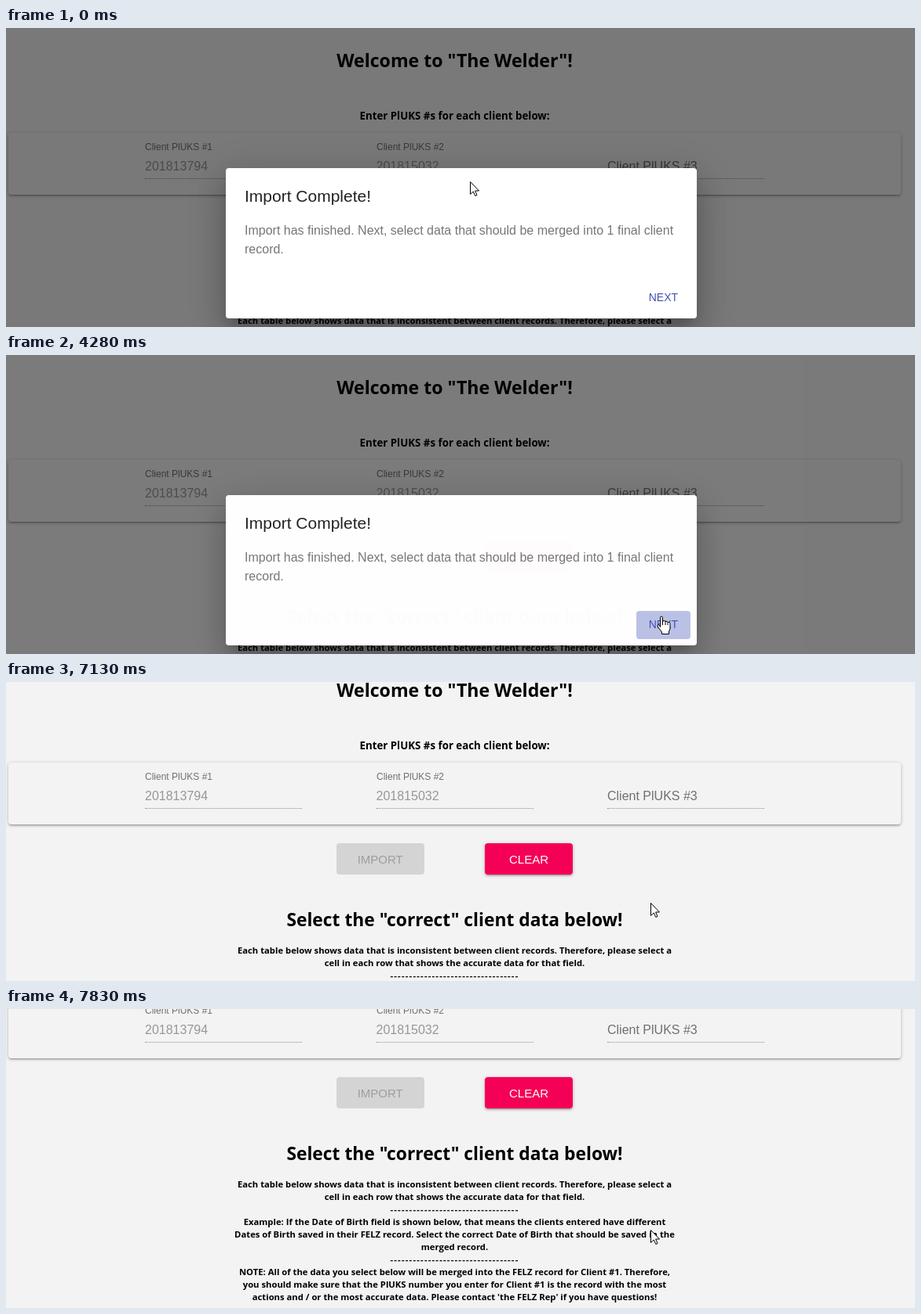
Write an HTML page that moves like this. It is 1158 by 382 pixels and loops after 8 s.

```html
<!DOCTYPE html>
<html lang="en">
<head>
<meta charset="utf-8">
<title>Client merge</title>
<style>
  html, body { margin: 0; width: 100%; height: 100%; overflow: hidden; background: #f3f3f3; }
  #stage { position: relative; width: 1158px; height: 382px; overflow: hidden; }
  #stage div, svg { position: absolute; }
  svg { left: 0; top: 0; overflow: visible; }
  text { font-family: "Liberation Sans", Arial, sans-serif; font-size: 16px; fill: rgba(0,0,0,.54); }

  #page { left: 0; top: 0; width: 1158px; height: 560px; }
  .bold text { font: 700 11.28px "Open Sans", "Noto Sans", sans-serif; fill: #000; text-anchor: middle; }
  .bold .title { font-size: 23.1px; }
  .bold .heading { font-size: 22.8px; }
  .bold .lead { font-size: 13.3px; }
  .bold .rule { letter-spacing: 1.2px; }
  .label { font-size: 12px; }
  .value { fill: rgba(0,0,0,.38); }
  .button { font-size: 15px; text-anchor: middle; fill: #fff; }
  .button.off { fill: rgba(0,0,0,.26); }

  .raised { border-radius: 4px;
    box-shadow: 0 1px 5px rgba(0,0,0,.2), 0 2px 2px rgba(0,0,0,.14), 0 3px 1px -2px rgba(0,0,0,.12); }
  .card { left: 3px; top: 134px; width: 1137px; height: 79px; background: #f3f3f3; }
  .line { top: 192px; width: 200px; border-bottom: 1px dotted rgba(0,0,0,.42); }
  .import, .clear { top: 237px; width: 112px; height: 40px; border-radius: 4px; }
  .import { left: 421px; background: #d4d4d4; }
  .clear { left: 610px; background: #f50057; }

  #modal { inset: 0; background: rgba(0,0,0,.5); }
  .dialog { left: 280px; top: 179px; width: 600px; height: 192px; border-radius: 4px; background: #fff;
    box-shadow: 0 11px 15px -7px rgba(0,0,0,.2), 0 24px 38px 3px rgba(0,0,0,.14), 0 9px 46px 8px rgba(0,0,0,.12); }
  #next { left: 803px; top: 327px; width: 69px; height: 36px; border-radius: 4px; overflow: hidden; }
  #ripple { left: 32px; top: 7px; border-radius: 50%; background: rgba(63,81,181,.3); transform: translate(-50%, -50%); }
  .dialog-title { font-size: 21px; fill: rgba(0,0,0,.87); }
  .next-label { font-size: 14px; fill: #3f51b5; }
  #cursor path { fill: #fff; stroke: #000; stroke-linejoin: round; }
</style>
</head>
<body>
<div id="stage">
  <div id="page">
    <div class="card raised"></div>
    <div class="line" style="left:177px"></div>
    <div class="line" style="left:472px"></div>
    <div class="line" style="left:766px"></div>
    <div class="import"></div>
    <div class="clear raised"></div>
    <svg width="1158" height="560">
      <g class="bold" id="copy">
        <text class="title" x="571.5" y="50">Welcome to "The Welder"!</text>
        <text class="lead" x="571.5" y="117">Enter PlUKS #s for each client below:</text>
        <text class="heading" x="571.5" y="343">Select the "correct" client data below!</text>
      </g>
      <text class="label" x="177" y="156">Client PlUKS #1</text>
      <text class="label" x="472" y="156">Client PlUKS #2</text>
      <text class="value" x="177" y="182">201813794</text>
      <text class="value" x="471.5" y="182">201815032</text>
      <text x="766" y="182">Client PlUKS #3</text>
      <text class="button off" x="476.7" y="263">IMPORT</text>
      <text class="button" x="666" y="263">CLEAR</text>
    </svg>
  </div>

  <div id="modal">
    <div class="dialog"></div>
    <div id="next"><div id="ripple"></div></div>
    <svg width="1158" height="382">
      <text class="dialog-title" x="304" y="222">Import Complete!</text>
      <text x="304" y="264">Import has finished. Next, select data that should be merged into 1 final client</text>
      <text x="304" y="288">record.</text>
      <text class="next-label" x="818.7" y="349">NEXT</text>
    </svg>
  </div>

  <svg width="1158" height="382">
    <g id="cursor">
      <circle id="press" r="12" fill="#ff0" fill-opacity=".47"/>
      <path id="arrow" d="M.5.5V16.5L4.3 13 6.8 18.5 9 17.5 6.6 12H11.5Z"/>
      <g id="hand">
        <path d="M-1.5 13.5V1.5a1.5 1.5 0 0 1 3 0V7a1.5 1.5 0 0 1 3.5.5a1.5 1.5 0 0 1 3 1a1.5 1.5 0 0 1 3 1V15q0 2-1.5 4v3.5h-9V20L-4.5 13.5q-1.5-3 1-3z"/>
        <path d="M1.5 7v4M5 8v3M8 9v2"/>
      </g>
    </g>
  </svg>
</div>
<script>
  const LOOP = 8000, TICK = 78, MOVE = 1470;
  const $ = id => document.getElementById(id);
  const show = (id, on) => $(id).style.display = on ? '' : 'none';

  const rule = '-'.repeat(34);
  const help = [
    'Each table below shows data that is inconsistent between client records. Therefore, please select a',
    'cell in each row that shows the accurate data for that field.',
    rule,
    'Example: If the Date of Birth field is shown below, that means the clients entered have different',
    'Dates of Birth saved in their FELZ record. Select the correct Date of Birth that should be saved in the',
    'merged record.',
    rule,
    'NOTE: All of the data you select below will be merged into the FELZ record for Client #1. Therefore,',
    'you should make sure that the PlUKS number you enter for Client #1 is the record with the most',
    "actions and / or the most accurate data. Please contact 'the FELZ Rep' if you have questions!"
  ];
  help.forEach((line, i) => {
    const text = document.createElementNS($('copy').namespaceURI, 'text');
    text.setAttribute('x', 571.5);
    text.setAttribute('y', 378 + 16 * i);
    if (line === rule) text.setAttribute('class', 'rule');
    text.textContent = line;
    $('copy').append(text);
  });

  // Stepped tracks: [time, value]
  const scroll = [[0, 0], [6900, 3], [7010, 14], [7090, 31], [7170, 50], [7250, 66], [7300, 77], [7370, 88],
    [7460, 106], [7530, 121], [7610, 133], [7690, 141], [7770, 147], [7830, 150]];
  const fade = [[0, 1], [4280, .99], [4370, .45], [4450, .1], [4540, 0]];
  const ripple = [[0, 0], [3740, 12], [3820, 28], [3900, 42], [3980, 60]];
  // Pointer path: [time, x, y]
  const path = [[1392, 591, 196], [2250, 772, 303], [2640, 813, 324], [2718, 813, 324], [2796, 822, 329], [3108, 835, 334]];

  const hold = (track, t) => track.reduce((v, [at, value]) => t >= at ? value : v, track[0][1]);

  function pointer(t) {
    if (t >= 5230) return [821, 282];
    const q = MOVE + Math.floor((t - MOVE) / TICK) * TICK;
    if (q <= path[0][0]) return path[0].slice(1);
    const i = path.findIndex(p => p[0] > q);
    if (i < 0) return path[path.length - 1].slice(1);
    const [t0, x0, y0] = path[i - 1], [t1, x1, y1] = path[i];
    let p = (q - t0) / (t1 - t0);
    if (i === 1) p = (p + p * p * (3 - 2 * p)) / 2;
    return [Math.round(x0 + (x1 - x0) * p), Math.round(y0 + (y1 - y0) * p)];
  }

  function draw(t) {
    $('page').style.transform = `translateY(${-hold(scroll, t)}px)`;

    const opacity = hold(fade, t);
    $('modal').style.opacity = opacity;
    show('modal', opacity > 0);

    const size = 2 * hold(ripple, t) + 'px';
    $('ripple').style.width = $('ripple').style.height = size;
    $('next').style.background = t >= 3740 ? 'rgba(63,81,181,.08)' : 'none';

    const isHand = t >= 2796 && t < 4540;
    $('cursor').setAttribute('transform', `translate(${pointer(t)})`);
    show('hand', isHand);
    show('arrow', !isHand);
    show('press', t >= 3580 && t < 4130);
  }

  let start;
  function tick(now) {
    start ??= now;
    draw((now - start) % LOOP);
    requestAnimationFrame(tick);
  }
  draw(0);
  requestAnimationFrame(tick);
</script>
</body>
</html>
```
